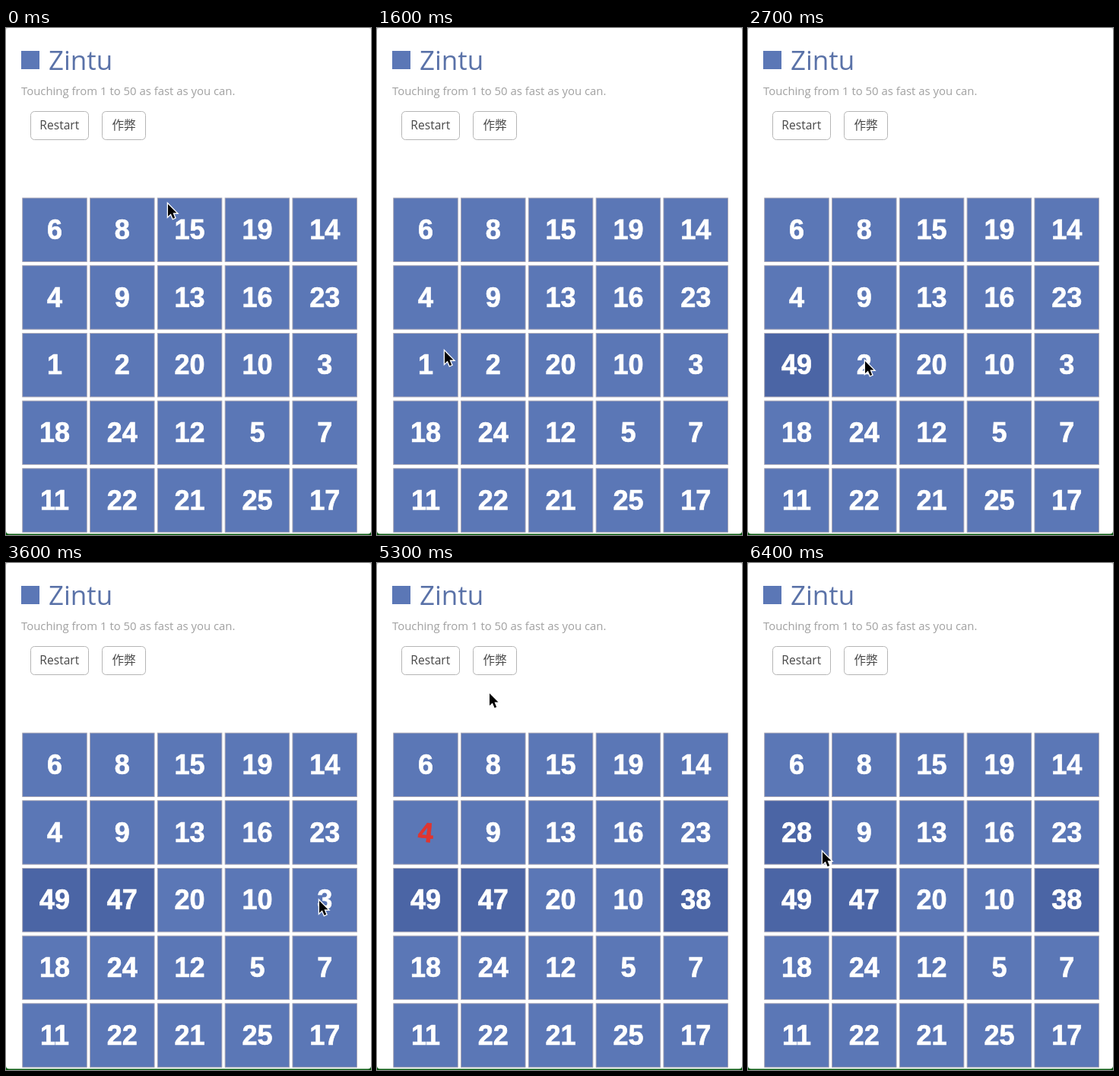
These frames come from a looping animation (480 px wide and 665 px high, 6500 ms). An HTML page:

```html
<!DOCTYPE html>
<html lang="en">
<head>
<meta charset="utf-8">
<title>Zintu</title>
<style>
  html, body { margin: 0; width: 100%; height: 100%; overflow: hidden; background: #fff; }
  svg { display: block; width: 100%; height: 100%; }
  text { font-family: "Open Sans", "Noto Sans CJK JP", "Noto Sans CJK SC", sans-serif; }
  .title { font-size: 35px; fill: #5a72a8; }
  .tagline { font-size: 14.9px; fill: #a0a0a0; }
  .button { fill: #fff; stroke: #b5b5b5; }
  .label { font-size: 15.6px; fill: #484848; text-anchor: middle; }
  .tile { fill: #5b77b6; stroke: #a9a6b4; stroke-width: .9; }
  .tile.done { fill: #4b65a5; }
  .number {
    font: bold 36px "Liberation Sans", Arial, sans-serif;
    fill: #fff; stroke: #fff; stroke-width: .7; text-anchor: middle;
  }
  .number.hint { fill: #e0352f; stroke: #e0352f; }
</style>
</head>
<body>
<svg id="stage" viewBox="0 0 480 665">
  <rect width="480" height="12" fill="#d8d8d8"/>
  <rect y="650" width="480" height="15" fill="#0b5c12"/>
  <rect width="480" height="663.5" rx="4" fill="#fff"/>
  <rect x="20" y="30" width="24" height="24" fill="#5b77b6"/>
  <text class="title" x="56" y="55">Zintu</text>
  <text class="tagline" x="20" y="87.5">Touching from 1 to 50 as fast as you can.</text>
  <rect class="button" x="32.5" y="109.5" width="76" height="37" rx="5"/>
  <text class="label" x="70.3" y="133">Restart</text>
  <rect class="button" x="126.5" y="109.5" width="57" height="37" rx="5"/>
  <text class="label" x="155" y="133">作弊</text>
  <g id="board"></g>
  <path id="cursor" d="M0 0V16L3.8 12.6L6.6 19L9.2 17.9L6.5 11.6H11.5Z"
        stroke="#fff" stroke-width="2.6" paint-order="stroke"/>
</svg>
<script>
const LOOP = 6500;
const TAP_DELAY = 250;
const numbers = "6 8 15 19 14 4 9 13 16 23 1 2 20 10 3 18 24 12 5 7 11 22 21 25 17".split(" ");

// Where the pointer goes; a tap replaces a number shortly after arrival
const stops = [
  { at: 0, x: 213, y: 231 },
  { at: 1600, x: 89, y: 424, tap: "1", becomes: "49" },
  { at: 2700, x: 154, y: 437, tap: "2", becomes: "47" },
  { at: 3600, x: 412, y: 443, tap: "3", becomes: "38" },
  { at: 4100, x: 331, y: 371 },
  { at: 4950, x: 155, y: 130, hint: "4" },
  { at: 5300, x: 148, y: 171 },
  { at: 5800, x: 80, y: 362, tap: "4", becomes: "28" },
  { at: 6400, x: 98, y: 379 },
  { at: LOOP, x: 98, y: 379 }
];

function add(parent, name, attributes) {
  const node = document.createElementNS(parent.namespaceURI, name);
  for (const key in attributes) node.setAttribute(key, attributes[key]);
  return parent.appendChild(node);
}

const board = document.getElementById("board");
const cursor = document.getElementById("cursor");
const tiles = numbers.map((number, i) => {
  const x = 21.7 + (i % 5) * 88.8;
  const y = 223 + Math.floor(i / 5) * 88.7;
  const rect = add(board, "rect", { class: "tile", x, y, width: 84.6, height: 83.5 });
  const text = add(board, "text", { class: "number", x: x + 42.3, y: y + 54 });
  text.textContent = number;
  return {
    number, rect, text, cx: x + 42.3, cy: y + 41.5,
    tapStop: stops.find(stop => stop.tap === number),
    hintStop: stops.find(stop => stop.hint === number)
  };
});

function pointerAt(time) {
  const next = stops.findIndex(stop => stop.at > time);
  const from = stops[next - 1];
  const to = stops[next];
  const p = (time - from.at) / (to.at - from.at);
  const eased = p * p * (3 - 2 * p);
  return [from.x + (to.x - from.x) * eased, from.y + (to.y - from.y) * eased];
}

function drawTile({ number, rect, text, cx, cy, tapStop, hintStop }, time) {
  const done = time >= tapStop.at + TAP_DELAY;
  const hinted = !done && hintStop !== undefined && time >= hintStop.at;
  rect.classList.toggle("done", done);
  text.classList.toggle("hint", hinted);
  text.textContent = done ? tapStop.becomes : number;
  const age = hinted ? time - hintStop.at : 0;
  const angle = 8 * Math.sin(age / 220) * Math.max(0, 1 - age / 1000);
  text.setAttribute("transform", `rotate(${angle} ${cx} ${cy})`);
}

function draw(time) {
  for (const tile of tiles) if (tile.tapStop) drawTile(tile, time);
  cursor.setAttribute("transform", `translate(${pointerAt(time)})`);
}

const start = performance.now();
function tick() {
  draw((performance.now() - start) % LOOP);
  requestAnimationFrame(tick);
}
tick();
</script>
</body>
</html>
```
